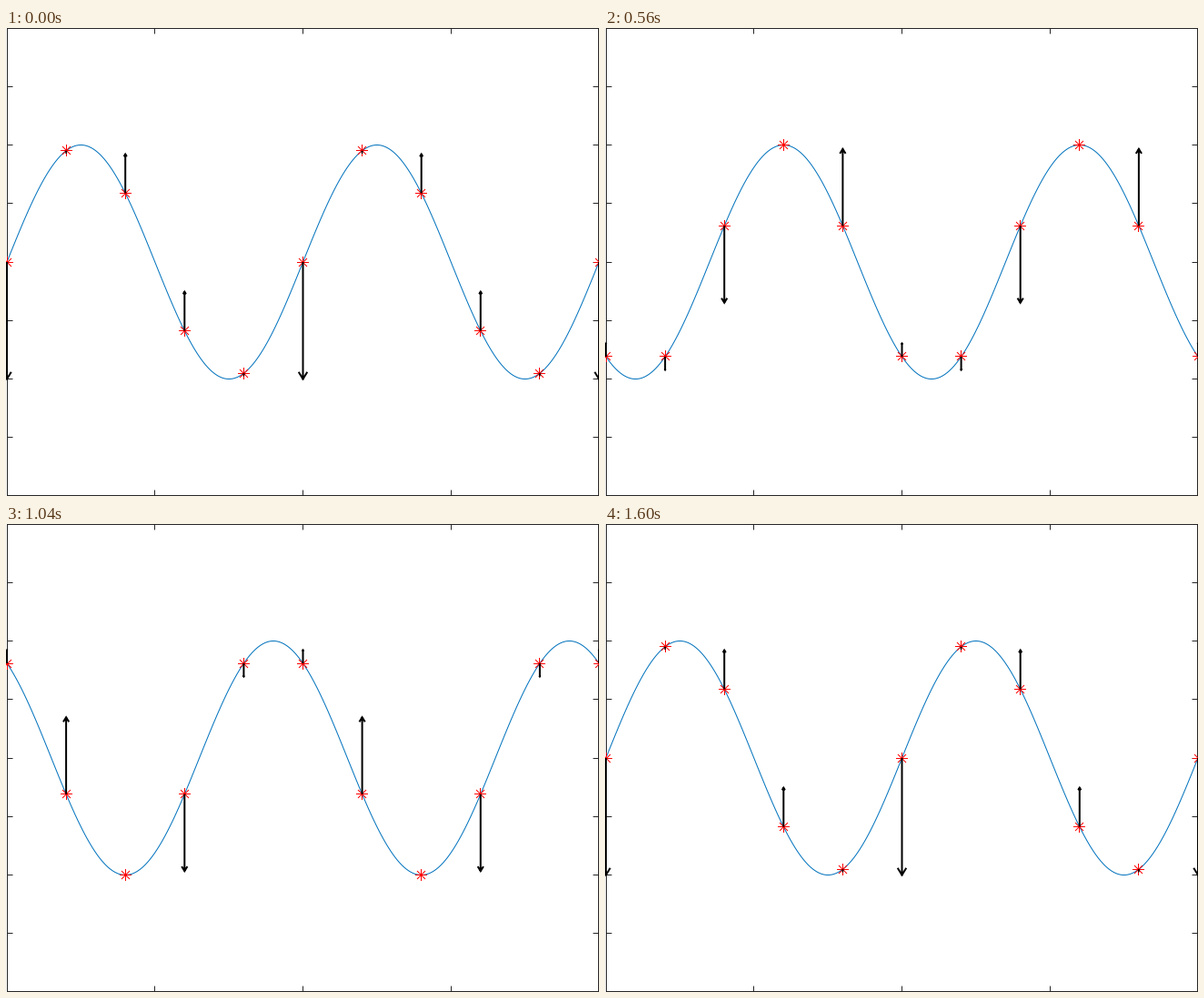
These frames come from a looping animation (652 by 514 pixels, 1.64 s). A matplotlib script:

```python
import numpy as np
import matplotlib.pyplot as plt
from matplotlib.animation import FuncAnimation

W, H, DPI = 652, 514, 100
FRAMES, STEP_MS = 41, 40
STEPS_PER_PERIOD = 40
LEFT, SPACING, POINTS = 1.0, 65.1, 11
PERIOD = 5 * SPACING
MID, AMP = 257.0, 128.5
GAP = (np.nan, np.nan)

plt.rcParams["path.simplify"] = False
fig = plt.figure(figsize=(W / DPI, H / DPI), dpi=DPI, facecolor="white")
ax = fig.add_axes([0, 0, 1, 1])
ax.set_xlim(0, W)
ax.set_ylim(H, 0)
ax.axis("off")


def make_line(color, width, z):
    return ax.plot([], [], color=color, lw=width * 72 / DPI, snap=False,
                   solid_capstyle="butt", solid_joinstyle="miter",
                   clip_on=False, zorder=z)[0]


def set_paths(line, paths):
    """Show several open polylines with one line artist."""
    pts = [p for path in paths for p in (*path, GAP)] or [GAP]
    line.set_data(*np.array(pts).T)


def pixel(v):
    """Centre of the pixel that holds v."""
    return np.floor(v + 1e-6) + 0.5


def box_paths():
    l, r, t, b, tick = 1.5, W - 0.5, 0.5, H - 0.5, 6
    paths = [[(l - 0.5, y), (r + 0.5, y)] for y in (t, b)]
    paths += [[(x, t), (x, b)] for x in (l, r)]
    for i in range(1, 4):
        x = pixel(LEFT + i * 2 * PERIOD / 4)
        paths += [[(x, t), (x, t + tick)], [(x, b), (x, b - tick)]]
    for i in range(1, 8):
        y = pixel(i * AMP / 2)
        paths += [[(l, y), (l + tick, y)], [(r, y), (r - tick, y)]]
    return paths


def star_paths(x, y):
    cx, cy = pixel(x), pixel(y)
    arms = ((6.5, 0), (0, 6.5), (4.5, 4.5), (4.5, -4.5))
    return [[(cx - dx, cy - dy), (cx + dx, cy + dy)] for dx, dy in arms]


def arrow_paths(x, y, dy):
    if abs(dy) < 1:
        return []
    tip = y + dy
    back, half = 0.06 * dy, 0.037 * abs(dy)
    head = [(x - half, tip - back), (x, tip), (x + half, tip - back)]
    return [[(x, y), (x, tip)], head]


frame_box = make_line("#262626", 1, 1)
curve = make_line("#0072BD", 1, 2)
stars = make_line("#FF0000", 1, 3)
arrows = make_line("black", 2, 4)
set_paths(frame_box, box_paths())

wave_x = np.linspace(LEFT, W, 1000)
point_x = LEFT + SPACING * np.arange(POINTS)


def phase(x, i):
    return 2 * np.pi * ((x - LEFT) / PERIOD - i / STEPS_PER_PERIOD)


def update(i):
    curve.set_data(wave_x, MID - AMP * np.sin(phase(wave_x, i)))
    p = phase(point_x, i)
    y = MID - AMP * np.sin(p)
    # Velocity fades towards the crests and troughs.
    dy = AMP * np.cos(p) * (1 - np.abs(np.sin(p)))
    set_paths(stars, [s for q in zip(point_x, y) for s in star_paths(*q)])
    set_paths(arrows, [a for q in zip(point_x, y, dy) for a in arrow_paths(*q)])
    return curve, stars, arrows


anim = FuncAnimation(fig, update, frames=FRAMES, interval=STEP_MS,
                     repeat=True, repeat_delay=0, blit=False)
plt.show()
```
